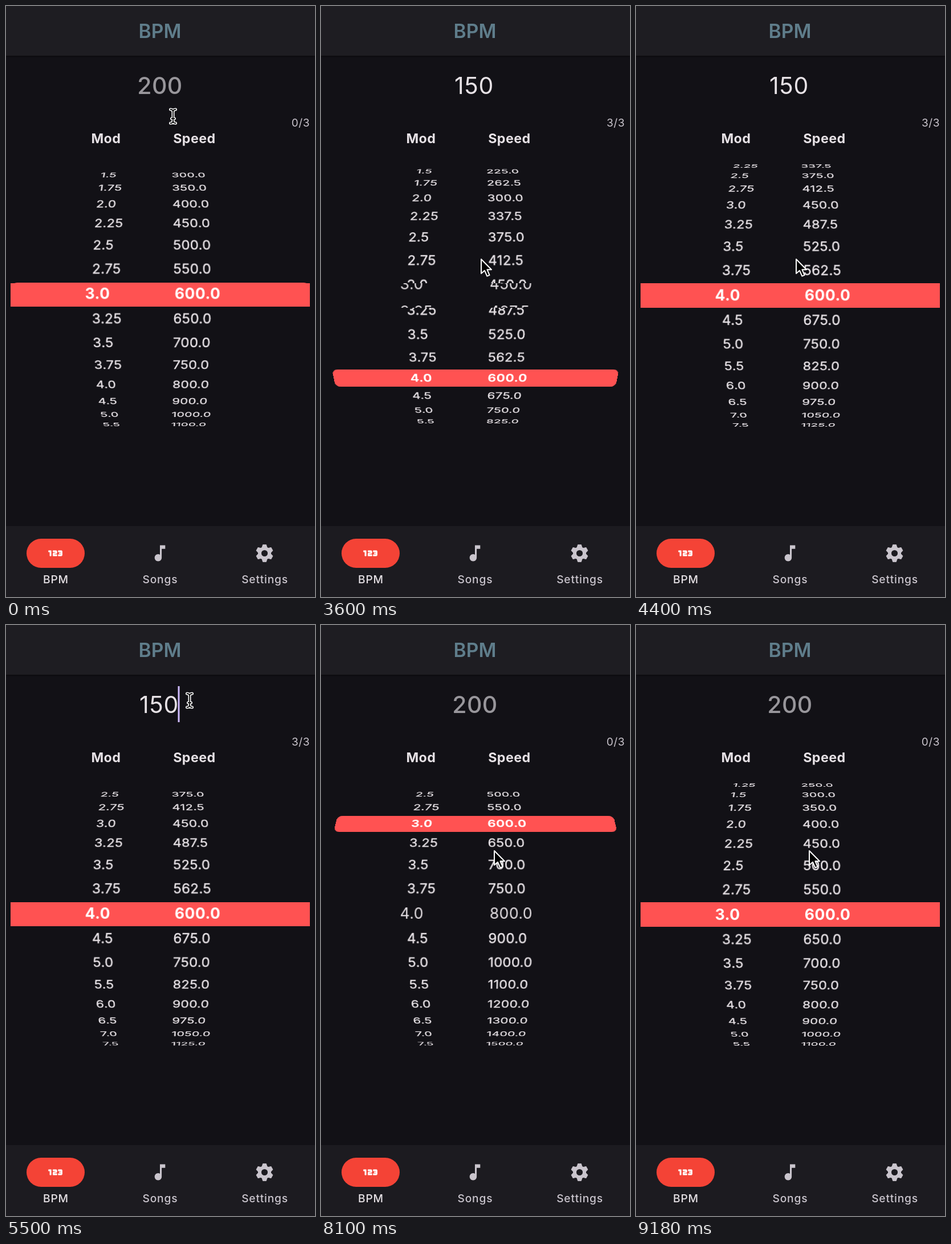
These frames come from a looping animation (542 px wide and 1034 px high, 9.37 s). An HTML page:

```html
<!DOCTYPE html>
<html lang="en">
<head>
<meta charset="utf-8">
<title>BPM wheel</title>
<style>
html, body { margin: 0; width: 100%; height: 100%; overflow: hidden; background: #121116; }
#stage { position: relative; width: 542px; height: 1034px; overflow: hidden; background: #121116;
  font-family: Inter, "Open Sans", sans-serif; color: #e6e1e5; }
svg { position: absolute; left: 0; top: 0; }
.head { position: absolute; left: 0; top: 0; width: 542px; height: 87px; background: #1e1d22;
  box-shadow: 0 1px 3px rgba(0, 0, 0, .6); }
.foot { position: absolute; left: 0; top: 910px; width: 542px; height: 124px; background: #1c1b20; }
.layer, .scene { position: absolute; inset: 0; }
.scene { perspective: 630px; perspective-origin: 270.5px 506.5px; transform-origin: 270.5px 506.5px; }
.row { position: absolute; left: 8.5px; top: 486.5px; width: 524px; height: 40px; border-radius: 11px;
  font-size: 24.2px; line-height: 40px; letter-spacing: .4px; white-space: nowrap; }
.row span { position: absolute; top: 0; left: 141.6px; }
.row span + span { left: 284.4px; }
.edge .row { -webkit-text-stroke: .5px currentColor; }
.row.hit { background: #ff5252; color: #fff; font-weight: 700; -webkit-text-stroke: 0; }
#entry { position: absolute; left: 268.5px; top: 107px; height: 63px; transform: translateX(-50%);
  font-size: 41px; line-height: 64px; letter-spacing: .7px; white-space: nowrap; }
#caret { position: absolute; left: 100%; top: 0; width: 3px; height: 63px; margin-left: -1px; background: #d0bcff; }
</style>
</head>
<body>
<div id="stage">
  <div class="head"></div>
  <div class="foot"></div>
  <svg width="542" height="1034" fill="#cac5cd">
    <g text-anchor="middle">
      <text x="270" y="56" font-size="33.6" font-weight="600" fill="#5f7d8b">BPM</text>
      <text id="hint" x="270" y="154" font-size="41" font-weight="500" letter-spacing=".5" fill="#98969b">200</text>
      <g font-size="19.2" font-weight="500" letter-spacing=".8">
        <text x="87.4" y="1010" fill="#e6e1e5">BPM</text>
        <text x="270.4" y="1010">Songs</text>
        <text x="454" y="1010">Settings</text>
      </g>
    </g>
    <g font-size="23.3" font-weight="700" letter-spacing=".4" fill="#e6e1e5">
      <text x="149.5" y="239.5">Mod</text>
      <text x="293.2" y="239.5">Speed</text>
    </g>
    <text id="count" x="533" y="211" font-size="19" letter-spacing=".6" text-anchor="end"></text>
    <rect x="36" y="932" width="102" height="51" rx="25.5" fill="#f44336"/>
    <path transform="translate(68.4 938.9) scale(1.55)" fill="#fff" stroke="#fff" stroke-width=".4" d="M7 15H5.5v-4.5H4V9h3v6zm6.5-1.5h-3v-1h2c.55 0 1-.45 1-1V10c0-.55-.45-1-1-1H9v1.5h3v1h-2c-.55 0-1 .45-1 1V15h4.5v-1.5zm6 .5v-4c0-.55-.45-1-1-1H15v1.5h3v1h-2v1h2v1h-3V15h3.5c.55 0 1-.45 1-1z"/>
    <path transform="translate(251.4 938.9) scale(1.55)" d="M12 3v10.55c-.59-.34-1.27-.55-2-.55-2.21 0-4 1.79-4 4s1.79 4 4 4 4-1.79 4-4V7h4V3h-6z"/>
    <g id="gear" transform="translate(453.5 957.5) scale(1.55)">
      <circle r="5.5" fill="none" stroke="#cac5cd" stroke-width="3.8"/>
    </g>
  </svg>
  <div id="wheel"></div>
  <div id="entry"><span id="typed"></span><i id="caret"></i></div>
  <svg width="542" height="1034">
    <path id="arrow" d="M0 0V25L6 19.8 10.3 29.6 14.6 27.8 10.4 18.2H18Z" fill="#000" stroke="#fff" stroke-width="2" stroke-linejoin="round"/>
    <g id="beam" fill="none" stroke-linecap="round"></g>
  </svg>
</div>
<script>
const LOOP = 9370, RADIUS = 359, STEP = 7, REACH = 7.02;
const $ = id => document.getElementById(id);

// time, typed text
const typing = [[0, ""], [1600, "1"], [2300, "15"], [2600, "150"], [6000, "15"], [6300, "1"], [6600, ""]];
// caret visible from, to
const blinks = [[1300, 2000], [2300, 3100], [3700, 4200], [4600, 5000], [5500, 7100], [7600, 8100], [8600, 9180]];
// time, row at the wheel's centre
const spin = [[0, 8.07], [3500, 8.07], [3600, 8.42], [3800, 10.35], [4000, 11.69], [4200, 11.95], [4500, 12.04],
  [8200, 12.04], [8300, 11.6], [8500, 9.8], [8700, 8.6], [8900, 8.1], [9000, 8]];
// time, pointer position
const moves = [[0, 293, 193], [1000, 274, 146], [2500, 274, 146], [3400, 281, 443], [4500, 281, 443],
  [5300, 322, 132], [6500, 322, 132], [7200, 304, 395]];

const mods = [];
for (let m = 1; m <= 8; m += m < 4 ? .25 : .5) mods.push(m);

const decimal = n => Number.isInteger(n) ? n + ".0" : String(n);
const smooth = u => u * u * (3 - 2 * u);

function sample(table, t, ease = u => u) {
  const i = table.findLastIndex(r => r[0] <= t), a = table[i], b = table[i + 1];
  if (!b) return a.slice(1);
  const u = ease((t - a[0]) / (b[0] - a[0]));
  return a.slice(1).map((v, j) => v + (b[j + 1] - v) * u);
}

function add(parent, tag, cls = "") {
  const el = parent.appendChild(document.createElement(tag));
  el.className = cls;
  return el;
}

// The band in the middle is magnified; the parts above and below are not.
function makeLayer(top, bottom, zoom) {
  const layer = add($("wheel"), "div", zoom > 1 ? "layer" : "layer edge");
  layer.style.clipPath = `inset(${top}px 9.5px ${1034 - bottom}px 8px)`;
  const scene = add(layer, "div", "scene");
  if (zoom > 1) scene.style.transform = `scale(${zoom})`;
  return mods.map((mod, i) => {
    const el = add(scene, "div", "row");
    add(el, "span").textContent = decimal(mod);
    return { el, mod, i, speed: add(el, "span") };
  });
}
const rows = [makeLayer(262, 485, 1), makeLayer(528, 750, 1), makeLayer(485, 528, 1.1)].flat();

$("gear").innerHTML += [0, 1, 2, 3, 4, 5].map(n =>
  `<path transform="rotate(${n * 60})" d="M-3-6L-1.9-9.6H1.9L3-6Z" stroke="#cac5cd" stroke-width=".6" stroke-linejoin="round"/>`).join("");
$("beam").innerHTML = [["#fff", 5], ["#111", 1.8]].map(([color, width]) =>
  `<path d="M-4.5-12Q0-12 0-8Q0-12 4.5-12M0-8V8M-4.5 12Q0 12 0 8Q0 12 4.5 12M-2.5 4H2.5" stroke="${color}" stroke-width="${width}"/>`).join("");

let shown = null;
function setText(text) {
  if (text === shown) return;
  shown = text;
  const bpm = Number(text || 200);
  $("typed").textContent = text;
  $("hint").style.display = text ? "none" : "";
  $("count").textContent = text.length + "/3";
  for (const r of rows) {
    const speed = r.mod * bpm;
    r.speed.textContent = decimal(speed);
    r.el.classList.toggle("hit", speed === 600);
  }
}

function draw(time) {
  const t = time >= 9180 ? 9180 : Math.floor(time / 100) * 100;
  setText(typing.findLast(r => r[0] <= t)[1]);
  $("caret").style.visibility = blinks.some(([a, b]) => t >= a && t < b) ? "visible" : "hidden";

  const [pos] = sample(spin, t);
  for (const r of rows) {
    const k = r.i - pos, on = Math.abs(k) <= REACH;
    r.el.style.display = on ? "" : "none";
    if (on) r.el.style.transform = `translateZ(${-RADIUS}px) rotateX(${-k * STEP}deg) translateZ(${RADIUS}px)`;
  }

  const [x, y] = sample(moves, t, smooth), inField = y < 215;
  $("beam").style.display = inField ? "" : "none";
  $("arrow").style.display = inField ? "none" : "";
  $(inField ? "beam" : "arrow").setAttribute("transform", `translate(${x} ${y})`);
}

const start = performance.now();
function tick() {
  draw((performance.now() - start) % LOOP);
  requestAnimationFrame(tick);
}
tick();
</script>
</body>
</html>
```
